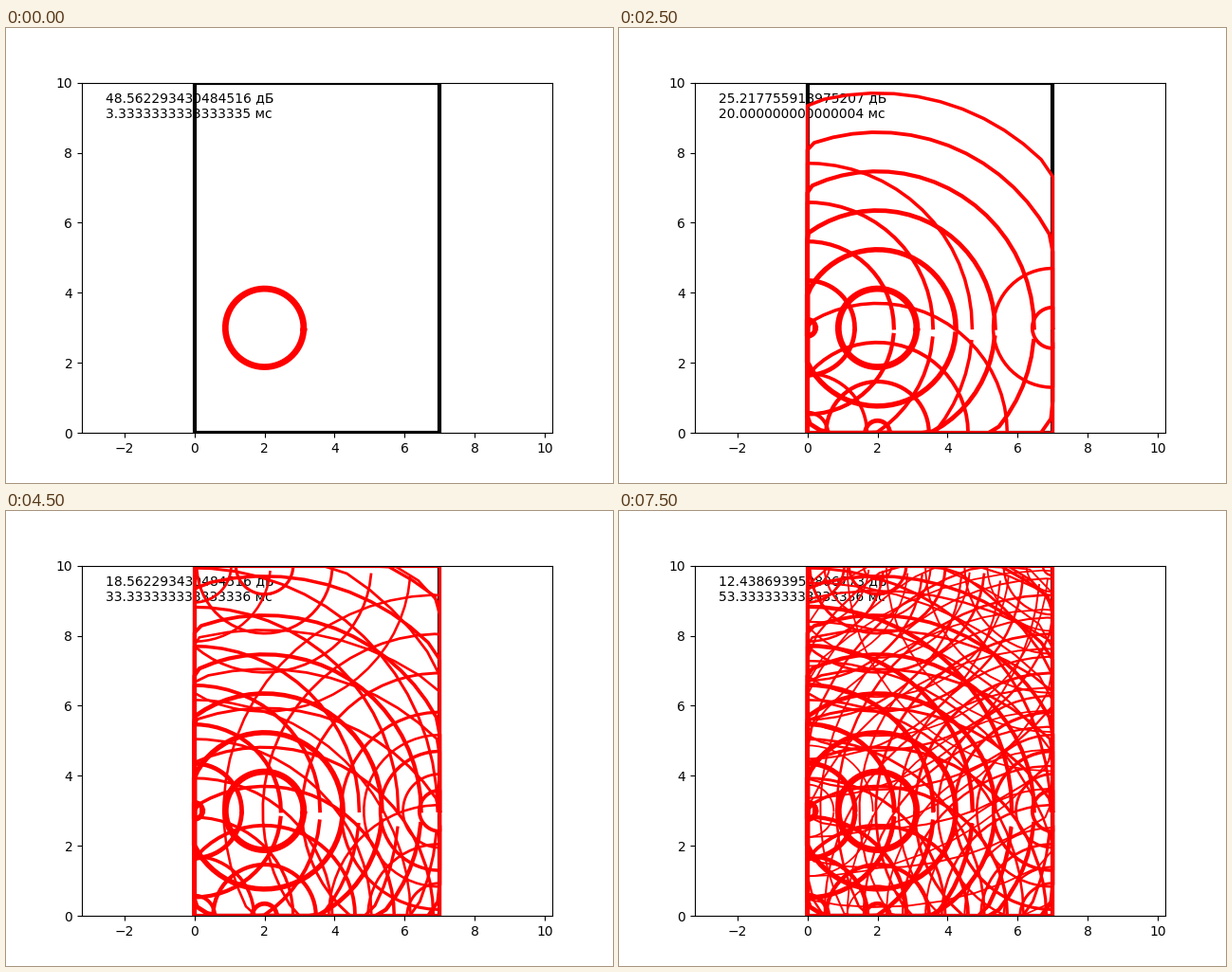
A matplotlib script for the animation above (8 s loop, 640 by 480 pixels).

```python
import numpy as np
import matplotlib.pyplot as plt
from matplotlib.animation import FuncAnimation
from matplotlib.patches import Rectangle

W, H = 7, 10            # room size, m
SOURCE = (2, 3)
SPEED = 335             # m/s
STEPS = 16
ANGLES = np.arange(0, 2 * np.pi, 0.1)


def elapsed(step):
    return 0.1 * step / 30


def level(dist):
    return 50 - 30 * np.log10(dist)


def find_emitters(limit):
    """Source plus the nearest wall points each wave reaches within limit."""
    found, queue = set(), [(*SOURCE, 0)]
    while queue:
        x, y, d = queue.pop()
        if d >= limit or (x, y, d) in found:
            continue
        found.add((x, y, d))
        walls = [(0, y, x), (W, y, W - x), (x, 0, y), (x, H, H - y)]
        queue += [(wx, wy, d + gap) for wx, wy, gap in walls if gap > 0]
    return sorted(found, key=lambda e: e[2])


fig, ax = plt.subplots(figsize=(6.4, 4.8), dpi=100)
half = 5 * 496 / 369.6
ax.set_xlim(W / 2 - half, W / 2 + half)
ax.set_ylim(0, H)
ax.add_patch(Rectangle((0, 0), W, H, fill=False, ec="black", lw=3, zorder=1))
label = ax.text(0.05, 0.9, "", transform=ax.transAxes, zorder=1.5)

emitters = find_emitters(SPEED * elapsed(STEPS))
waves = []
for step in range(1, STEPS + 1):
    dist = SPEED * elapsed(step)
    for x, y, d in emitters:
        if dist > d:
            px = np.clip(x + (dist - d) * np.cos(ANGLES), 0, W)
            py = np.clip(y + (dist - d) * np.sin(ANGLES), 0, H)
            line, = ax.plot(px, py, color="red", lw=level(dist) / 10)
            waves.append((step, line))


def update(i):
    step = i + 1
    t = elapsed(step)
    for born, line in waves:
        line.set_visible(born <= step)
    label.set_text(f"{float(level(SPEED * t))} дБ\n{t * 1000} мс")
    return [label]


anim = FuncAnimation(fig, update, frames=STEPS, interval=500, repeat=True,
                     repeat_delay=0)
plt.show()
```
